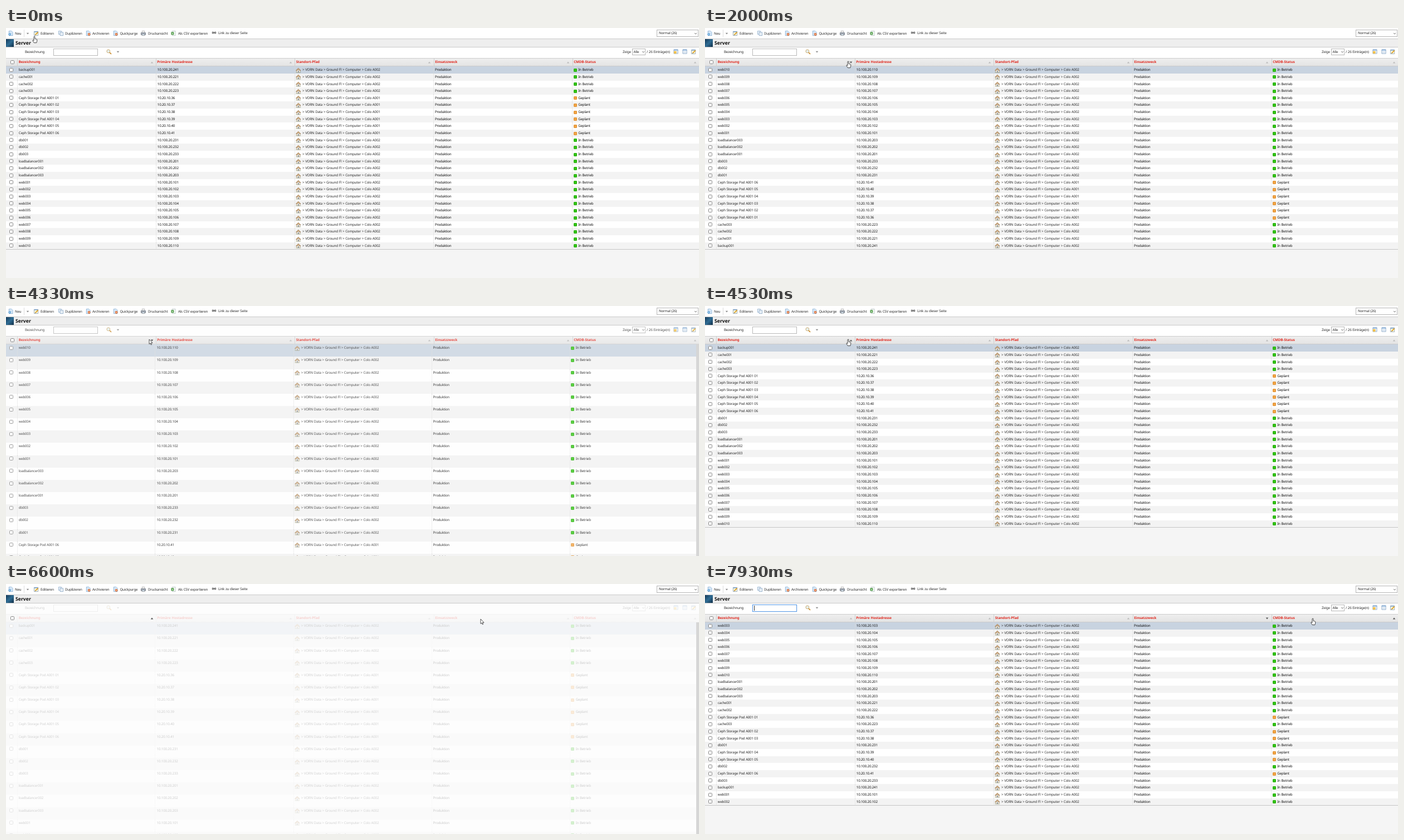
An HTML page that plays this animation: 1244 px wide and 450 px high, repeating every 8 s.

```html
<!DOCTYPE html>
<html lang="de">
<head>
<meta charset="utf-8">
<title>Server</title>
<style>
html, body { margin: 0; width: 100%; height: 100%; overflow: hidden; }
body {
  position: relative; background: #f5f5f5; color: #2b2b2b;
  font: 6.2px/12.66px "Noto Sans", "Open Sans", sans-serif;
  letter-spacing: -.22px; word-spacing: .4px; text-rendering: geometricPrecision; white-space: nowrap;
}
div, span, svg { position: absolute; box-sizing: border-box; }
svg { overflow: visible; }
#tools { left: 0; top: 0; width: 100%; height: 19px; background: #fff; }
#title { left: 0; top: 19px; width: 100%; height: 16px; background: #eee; border: solid #c9c9c9; border-width: 1px 0; }
#title span { left: 17px; top: 1px; font-size: 8.7px; font-weight: bold; letter-spacing: 0; color: #111; }
#badge { left: 0; top: 20px; width: 14px; height: 14px; background: linear-gradient(135deg, #163a58, #2f6c93 50%, #123049); }
#back { left: 0; top: 35px; width: 100%; bottom: 0; background: #fdfdfd; }
#pane { left: 0; top: 0; width: 100%; height: 100%; }
#filter { left: 0; top: 35px; width: 100%; height: 19px; background: #fff; }
#head { left: 0; top: 54px; width: 100%; height: 15px; background: linear-gradient(#eee, #e4e4e4); border: solid #ccc; border-width: 1px 0; }
#head span { top: 0; color: #e02a20; font-weight: bold; letter-spacing: -.06px; }
#head i { position: absolute; top: 0; width: 1px; height: 13px; background: #cfcfcf; }
#rows { left: 0; top: 69.2px; }
.row { left: 0; width: 100%; background: #fff; }
.row.even { background: #f3f3f3; }
.row.first { background: #c8d3e0; }
.row i { position: absolute; top: 0; bottom: 0; border-left: 1px dotted #d9d9d9; }
.row .name { letter-spacing: -.27px; }
.row .ip { letter-spacing: -.18px; color: #111; }
.row .path { letter-spacing: -.2px; }
.row .use { letter-spacing: -.3px; color: #111; }
.row .state { letter-spacing: -.2px; color: #111; }
.dot { top: 3.5px; width: 6px; height: 6px; border-radius: 1px; background: #32c414; border: .5px solid #2cae12; }
.plan .dot { background: #f2a444; border-color: #dd9238; }
.box { width: 7px; height: 7px; border: 1px solid #858585; border-radius: 1.5px; background: #fff; }
.select { border: 1px solid #b5b5b5; background: #fff; }
#field { left: 85px; top: 37px; width: 80px; height: 13px; border: 1px solid #b9b9b9; background: #fff; }
#field.on { border-color: #5b9be6; box-shadow: 0 0 1px #8cbcf2; }
#caret { left: 88px; top: 39px; width: 1px; height: 9px; background: #333; }
#foot { left: 0; top: 398px; width: 100%; bottom: 0; background: #f5f5f5; border-top: 1px solid #c6c6c6; z-index: 1; }
#rows { z-index: 0; }
#bar { right: 0; top: 69px; width: 5.5px; bottom: 0; background: #d6d6d6; }
#tip { left: 263px; top: 68.5px; width: 82px; height: 12.5px; background: #1f2227; color: #fff; line-height: 12px; padding-left: 3.5px; letter-spacing: -.01px; }
</style>
</head>
<body>
<svg width="0" height="0">
  <defs>
    <symbol id="page" viewBox="0 0 10 10" overflow="visible">
      <path d="M1.5 .5H6.5L9 3V9.5H1.5Z" fill="#e3f0fc" stroke="#6b9cc9" stroke-width=".8"/>
      <path d="M3 4H7M3 6H7" stroke="#9dbfdf" stroke-width=".7"/>
    </symbol>
    <symbol id="new" viewBox="0 0 10 10" overflow="visible">
      <use href="#page"/><circle cx="3" cy="7" r="2.4" fill="#3a8fd0"/><path d="M3 5.6V8.4M1.6 7H4.4" stroke="#fff" stroke-width=".8"/>
    </symbol>
    <symbol id="edit" viewBox="0 0 10 10" overflow="visible">
      <path d="M.5 1.5H8.5V9.5H.5Z" fill="#fdf8dc" stroke="#7e94ab" stroke-width=".8"/>
      <path d="M.5 2H8.5" stroke="#5e8fc4" stroke-width="1.4"/>
      <path d="M3 8L8.5 2.8" stroke="#e0a52e" stroke-width="2"/><path d="M2.4 8.6L3.6 7.4" stroke="#444"/>
    </symbol>
    <symbol id="copy" viewBox="0 0 10 10" overflow="visible">
      <path d="M.5 .5H6V7H.5Z" fill="#edf4fb" stroke="#7fa0c2" stroke-width=".8"/>
      <path d="M3.5 3H9.5V9.5H3.5Z" fill="#fff" stroke="#6d93b9" stroke-width=".8"/>
      <path d="M5 5H8M5 7H8" stroke="#a8c4de" stroke-width=".7"/>
    </symbol>
    <symbol id="drop" viewBox="0 0 10 10" overflow="visible">
      <use href="#page"/><circle cx="6.8" cy="7" r="2.6" fill="#e06a2c"/><path d="M5.4 7H8.2" stroke="#fff"/>
    </symbol>
    <symbol id="print" viewBox="0 0 10 10" overflow="visible">
      <path d="M2.5 .5H7.5V4H2.5Z" fill="#fff" stroke="#888" stroke-width=".7"/>
      <path d="M.5 4H9.5V8H.5Z" fill="#a9b2bd" stroke="#5f6873" stroke-width=".8"/>
      <path d="M2.5 6.5H7.5V9.5H2.5Z" fill="#dcecfa" stroke="#777" stroke-width=".7"/>
    </symbol>
    <symbol id="sheet" viewBox="0 0 10 10" overflow="visible">
      <path d="M2.5 .5H9V9.5H2.5Z" fill="#fff" stroke="#9aa" stroke-width=".7"/>
      <path d="M.5 2.5H6V8H.5Z" fill="#4d9a45"/><path d="M2 4L4.5 6.7M4.5 4L2 6.7" stroke="#fff" stroke-width=".8"/>
    </symbol>
    <symbol id="link" viewBox="0 0 10 10" overflow="visible">
      <path d="M1.5 3.5H4V6.5H1.5ZM6 3.5H8.5V6.5H6ZM3 5H7" fill="none" stroke="#555" stroke-width="1.1" stroke-linejoin="round"/>
    </symbol>
    <symbol id="zoom" viewBox="0 0 10 10" overflow="visible">
      <path d="M5.8 5.8L9 9" stroke="#c98b2c" stroke-width="1.7"/><circle cx="3.8" cy="3.8" r="2.9" fill="#e6f1fa" stroke="#c9a35c" stroke-width=".9"/>
    </symbol>
    <symbol id="list" viewBox="0 0 10 10" overflow="visible">
      <path d="M1 1H9V9H1Z" fill="#fff" stroke="#7b9cc0" stroke-width=".9"/><path d="M1 2H9" stroke="#6f9fd3" stroke-width="1.5"/>
      <path d="M2 5H8M2 7H8" stroke="#aac5e0" stroke-width=".8"/>
    </symbol>
    <symbol id="gold" viewBox="0 0 10 10" overflow="visible">
      <use href="#list"/><path d="M1 4H6V9H1Z" fill="#f3c14b"/>
    </symbol>
    <symbol id="home" viewBox="0 0 10 10" overflow="visible">
      <path d="M.3 9H9.7V9.6H.3Z" fill="#7f9a63"/><path d="M1.8 5H8.2V9.2H1.8Z" fill="#fdf6e6" stroke="#8d8069" stroke-width=".6"/>
      <path d="M4.1 6.2H5.9V9.2H4.1Z" fill="#7c8794"/><path d="M.5 5.6L5 1.2L9.5 5.6L8.2 6L5 3.4L1.8 6Z" fill="#e3b27a" stroke="#80684c" stroke-width=".6"/>
    </symbol>
  </defs>
</svg>

<div id="tools"></div>
<div id="title"><span>Server</span></div>
<div id="badge"></div>
<div id="back"></div>
<div id="pane">
  <div id="filter"></div>
  <div id="head"></div>
  <div id="rows"></div>
  <div id="foot"></div>
</div>
<div id="bar"></div>
<div id="tip">Allgemein &gt; Bezeichnung</div>
<svg id="cursor" width="1" height="1" style="left:0;top:0">
  <path id="hand" d="M-1 1A1 1 0 0 1 1 1V4.5L3.7 5.1Q5 5.5 4.8 7L4.5 9.2 3.8 11.6H-.7L-3 8Q-3.4 7-2.6 6.7-1.8 6.7-1 7.7Z" fill="#fff" stroke="#111" stroke-width=".75" stroke-linejoin="round"/>
  <path id="arrow" d="M0 0V8.6L2 6.9 3.3 9.9 4.6 9.3 3.3 6.4H6Z" fill="#fff" stroke="#111" stroke-width=".7" stroke-linejoin="round"/>
</svg>

<script>
const $ = id => document.getElementById(id);
const add = (parent, html) => {
  parent.insertAdjacentHTML('beforeend', html);
  return parent.lastElementChild;
};
const icon = (id, x, y, size = 10) =>
  `<svg style="left:${x};top:${y}px" width="${size}" height="${size}"><use href="#${id}"/></svg>`;
const text = (x, y, str) => `<span style="left:${x}px;top:${y}px">${str}</span>`;
const caretDown = (x, y) =>
  `<svg style="left:${x}px;top:${y}px" width="1" height="1"><path d="M-2.2 -1.2H2.2L0 1.4Z" fill="#888"/></svg>`;
const chevron = (x, y) =>
  `<svg style="left:${x}px;top:${y}px" width="1" height="1"><path d="M-2 -1L0 1L2 -1" fill="none" stroke="#555" stroke-width=".8"/></svg>`;
const box = (x, y) => `<div class="box" style="left:${x}px;top:${y}px"></div>`;

// Toolbar
const tools = [
  ['new', 4, 16, 'Neu'], ['edit', 50, 62, 'Editieren'], ['copy', 93.5, 106, 'Duplizieren'],
  ['drop', 142.5, 155, 'Archivieren'], ['drop', 192, 204.5, 'Quickpurge'],
  ['print', 242, 255, 'Druckansicht'], ['sheet', 295.5, 309, 'Als CSV exportieren'],
  ['link', 369, 381, 'Link zu dieser Seite']
];
for (const [id, ix, tx, label] of tools) {
  const up = id === 'link' ? 1 : 0;
  add($('tools'), icon(id, ix + 'px', 5 - up, 9) + text(tx, 3.6 - up, label));
}
add($('tools'), '<div style="left:32px;top:3px;width:1px;height:13px;background:#ddd"></div>' + caretDown(38.5, 10) +
  '<div class="select" style="left:1168px;top:3px;width:75px;height:13px"></div>' +
  text(1172, 3.2, 'Normal (26)') + chevron(1237.5, 9.8));

// Filter line
add($('filter'), text(34, 1.8, 'Bezeichnung') + icon('zoom', '180px', 3) + caretDown(200.5, 8) +
  text(1107, 1.8, 'Zeige') + '<div class="select" style="left:1124px;top:2px;width:24px;height:12px"></div>' +
  text(1126.5, 1.8, 'Alle') + chevron(1143.5, 8) + text(1150, 1.8, '/ 26 Einträge(n)') +
  icon('gold', '1197.5px', 3, 9) + icon('list', '1214px', 3, 9) + icon('edit', '1230px', 3, 9));
add($('pane'), '<div id="field"></div>');
add($('pane'), '<div id="caret"></div>');

// Table head
const edges = [20, 268.5, 518, 767.5, 1016.5];
const labels = ['Bezeichnung', 'Primäre Hostadresse', 'Standort-Pfad', 'Einsatzzweck', 'CMDB-Status'];
labels.forEach((label, i) =>
  add($('head'), `<i style="left:${edges[i]}px"></i>` + text(edges[i] + 2.7, 0, label)));
document.body.insertBefore(add(document.body, box(8, 57.5)), $('bar'));
const sorters = [262, 511, 760, 1009.3, 1236.5].map(x => {
  const el = add(document.body, `<svg style="left:${x}px;top:61.5px" width="1" height="1"><path d="M-2.3 1.4H2.3L0 -1.4Z"/></svg>`);
  document.body.insertBefore(el, $('bar'));
  return el.firstElementChild;
});

// Table body
const WIDTH = 1244;
const pct = x => (x / WIDTH * 100).toFixed(3) + '%';
const hosts = [];
const group = (name, count, digits, net, first, planned) => {
  for (let i = 0; i < count; i++)
    hosts.push({ name: name + String(i + 1).padStart(digits, '0'), ip: net + (first + i), planned });
};
group('backup', 1, 3, '10.100.20.', 241);
group('cache', 3, 3, '10.100.20.', 221);
group('Ceph Storage Pod A001 ', 6, 2, '10.20.10.', 36, true);
group('db', 3, 3, '10.100.20.', 231);
group('loadbalancer', 3, 3, '10.100.20.', 201);
group('web', 10, 3, '10.100.20.', 101);

const cell = (cls, x, str) => `<span class="${cls}" style="left:${pct(x)}">${str}</span>`;
const rows = hosts.map(h => add($('rows'), `<div class="row ${h.planned ? 'plan' : ''}">` +
  edges.map(x => `<i style="left:${pct(x)}"></i>`).join('') + box(5.5, 2.6) +
  cell('name', 22.8, h.name) + cell('ip', 271.8, h.ip) + icon('home', pct(520.3), 1.6, 9.6) +
  cell('path', 532, `&gt; VORN Data &gt; Ground Fl &gt; Computer &gt; Colo A00${h.planned ? 1 : 2}`) +
  cell('use', 770, 'Produktion') + `<div class="dot" style="left:${pct(1019)}"></div>` +
  cell('state', 1027.2, h.planned ? 'Geplant' : 'In Betrieb') + '</div>'));

const up = hosts.map((_, i) => i);
const down = [...up].reverse();
const byUse = [...up.slice(18), 13, 14, 15, 1, 2, 4, 3, 5, 6, 10, 7, 8, 11, 9, 12, 0, 16, 17];

// Timeline in steps of 1/15 s
const LOADS = [[25, 30, 26], [63, 68, 64], [94, 101, 94]];  // start, end, fade start
const FOCUS = [[31, 64], [69, 95], [103, 120]];
const TIPS = [[38, 63], [76, 78]];
const PATH = [
  [0, 51, 15], [2, 45, 19], [5, 86, 38], [9, 170, 60], [13, 215, 66], [17, 240, 66], [20, 257, 60], [75, 257, 60],
  [78, 300, 61], [84, 560, 66], [88, 720, 67], [93, 835, 65], [97, 852, 63], [100, 852, 63],
  [101, 920, 48], [102, 985, 38], [103, 1030, 38], [104, 1053, 40], [107, 1053, 40],
  [111, 1080, 64], [114, 1097, 67], [118, 1091, 62], [120, 1091, 62]
];
const inside = (spans, k) => spans.find(s => k >= s[0] && k < s[1]);
const show = (el, on) => { el.style.display = on ? '' : 'none'; };

function place(k) {
  const i = Math.max(1, PATH.findIndex(p => p[0] >= k));
  const [a, ax, ay] = PATH[i - 1], [b, bx, by] = PATH[i];
  const f = (k - a) / (b - a);
  return [ax + (bx - ax) * f, ay + (by - ay) * f];
}

function layout(order, pitch, width) {
  $('rows').style.width = width + 'px';
  order.forEach((h, i) => {
    const r = rows[h];
    r.style.top = i * pitch + 'px';
    r.style.height = pitch + .5 + 'px';
    r.style.zIndex = i;
    r.classList.toggle('first', i === 0);
    r.classList.toggle('even', i % 2 === 1);
  });
}

function render(k) {
  const load = inside(LOADS, k);
  const fade = load ? Math.min(1, Math.max(0, (k - load[2]) / 4)) : 0;
  const dim = 1 - .8 * fade;
  const order = k < 30 ? up : k < 68 ? down : k < 101 ? up : byUse;
  layout(order, fade ? 22.16 : 12.66, fade ? WIDTH - 5.5 : WIDTH);
  $('pane').style.opacity = dim;
  show($('foot'), !fade);
  show($('bar'), fade);

  const focus = inside(FOCUS, k);
  $('field').classList.toggle('on', !!focus);
  show($('caret'), focus && Math.floor((k - focus[0]) / 8) % 2 === 0);
  show($('tip'), inside(TIPS, k));

  const [x, y] = place(k);
  const onHead = !load && y >= 54 && y < 69;
  const hover = onHead ? edges.filter(e => x >= e).length - 1 : -1;
  const sorted = k < 30 ? -1 : k < 101 ? 0 : 3;
  const flip = (k >= 30 && k < 68) || k >= 101;
  sorters.forEach((s, i) => {
    const dark = i === hover || i === sorted;
    s.setAttribute('fill', dark ? '#555' : '#bdbdbd');
    s.setAttribute('opacity', dark ? 1 : dim);
    s.setAttribute('transform', i === sorted && flip ? 'scale(1 -1)' : '');
  });

  const link = onHead || (y < 19 && x > 48);
  show($('hand'), link);
  show($('arrow'), !link);
  $('cursor').style.transform = `translate(${x}px, ${y}px)`;
}

const start = performance.now();
let last = -1;
function tick() {
  const t = (performance.now() - start) % 8000;
  const k = Math.floor((t + 5) * 15 / 1000) % 120;
  if (k !== last) render(last = k);
  requestAnimationFrame(tick);
}
tick();
</script>
</body>
</html>
```
